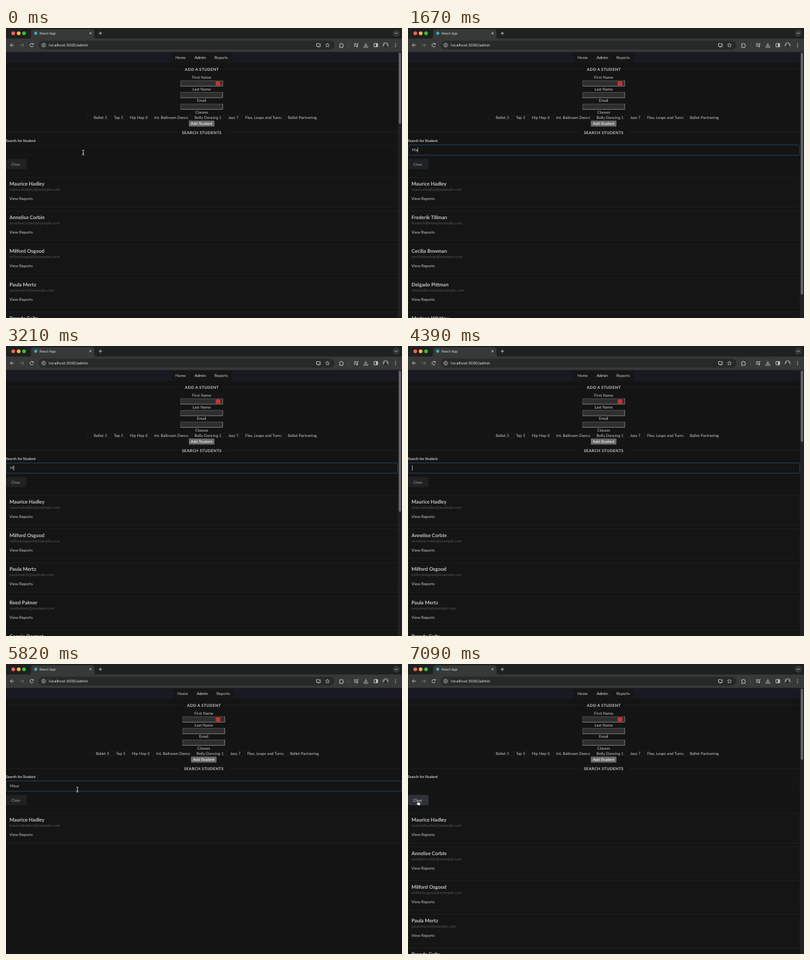
These frames come from a looping animation (600 px wide and 440 px high, 7150 ms). An HTML page:

```html
<!DOCTYPE html>
<html lang="en">
<head>
<meta charset="utf-8">
<title>React App</title>
<style>
  html, body { margin: 0; width: 100%; height: 100%; overflow: hidden; background: #141414; }
  svg { display: block; width: 600px; height: 440px; }
  text { font: 6px Lato, sans-serif; fill: #c8c8c8; text-rendering: geometricPrecision; white-space: pre; }
  .ui { font-family: Inter, sans-serif; fill: #e3e3e3; }
  .mid { text-anchor: middle; }
  .bold { font-weight: 700; }
  .title { font-weight: 700; letter-spacing: .3px; }
  .name { font-weight: 700; font-size: 7.55px; }
  .mail { fill: #555; font-size: 5.9px; }
  .icon { fill: none; stroke: #c7c7c7; stroke-width: .9; }
  .line { fill: none; stroke: #252525; stroke-width: .6; }
</style>
</head>
<body>
<svg viewBox="0 0 600 440" xmlns="http://www.w3.org/2000/svg">
  <rect width="600" height="440" fill="#141414"/>

  <!-- page -->
  <rect y="36" width="600" height="17" fill="#191a21"/>
  <g id="form">
    <rect x="250" y="37" width="92.5" height="15.5" rx="1.5" fill="#161617"/>
    <text x="256.5" y="47">Home</text>
    <text x="285.7" y="47" style="fill:#e4e4e4">Admin</text>
    <text x="315.7" y="47">Reports</text>
    <path class="line" d="M-4 62.3H265M328 62.3H600M-4 158.3H261M332 158.3H600"/>
    <text class="title mid" x="296.8" y="64.5">ADD A STUDENT</text>
    <text class="title mid" x="296.6" y="160.5">SEARCH STUDENTS</text>
    <g id="fields"></g>
    <text class="mid" x="296.5" y="130.2">Classes</text>
    <g id="classes"></g>
    <rect x="277" y="140.4" width="38.8" height="9.2" rx="1" fill="#6b6b6b"/>
    <text class="mid" x="296.4" y="147" style="fill:#fff">Add Student</text>
  </g>
  <rect x="317.7" y="81" width="7" height="6.4" rx="1" fill="#d1302b"/>

  <text class="bold" x="-.3" y="173.2" style="font-size:5.5px">Search for Student</text>
  <rect class="line wide" x=".3" y="177.4" height="15.6" rx="1.7" style="stroke:#1d1d1d"/>
  <rect class="line wide" id="focus" x=".3" y="177.4" height="15.6" rx="1.7" style="stroke:#2b455c;stroke-width:.9"/>
  <text id="query" x="6" y="187.4"></text>
  <rect id="caret" y="181.2" width=".7" height="7.6" fill="#ddd"/>
  <rect y="198.7" width="31" height="15.5" rx="1.7" fill="#202123"/>
  <rect id="hover" y="198.7" width="31" height="15.5" rx="1.7" fill="#2e3236"/>
  <text id="clear" x="8" y="208.6">Clear</text>
  <path d="M0 220H600" class="line" style="stroke:#1b1b1b"/>
  <g id="rows"></g>
  <g id="scroll">
    <rect x="593.8" y="36" width="6.2" height="404" fill="#212121"/>
    <rect id="thumb" x="595.2" y="37.5" width="3.4" rx="1.7" fill="#6a6a6a"/>
  </g>

  <!-- browser -->
  <rect width="600" height="17" fill="#1f2020"/>
  <rect y="16" width="600" height="20.4" fill="#373838"/>
  <path d="M34 16.5Q38 16.5 38 12.5V6Q38 2 42 2H130Q134 2 134 6V12.5Q134 16.5 138 16.5Z" fill="#373838"/>
  <circle cx="11" cy="8" r="2.8" fill="#ff5f57"/>
  <circle cx="19.2" cy="8" r="2.8" fill="#febc2e"/>
  <circle cx="27.3" cy="8" r="2.8" fill="#28c840"/>
  <circle cx="45" cy="8" r="2.4" fill="#3fa9c4"/>
  <text class="ui" x="51" y="9.9" style="font-size:5px">React App</text>
  <path class="icon" d="M126.5 6.3l3.2 3.2m0-3.2l-3.2 3.2M140.5 8h5m-2.5-2.5v5"/>
  <circle cx="591.3" cy="7.8" r="5.4" fill="#343535"/>
  <path class="icon" d="M589.3 7l2 2l2-2"/>
  <path class="icon" d="M12 26H6.6m2.6-2.7L6.5 26l2.7 2.7"/>
  <path class="icon" d="M21.4 26h5.4m-2.6-2.7l2.7 2.7l-2.7 2.7" style="stroke:#777"/>
  <path class="icon" d="M40.9 24.3A2.6 2.6 0 1 0 41.4 27M41.4 23v1.9h-1.9"/>
  <rect x="49.5" y="19.3" width="448" height="13.4" rx="6.7" fill="#272828"/>
  <circle cx="57" cy="26" r="5" fill="#373838"/>
  <circle class="icon" cx="57" cy="26" r="2.5" style="stroke-width:.7"/>
  <path class="icon" d="M57 25.6v1.8m0-3.2v.7" style="stroke-width:.7"/>
  <text class="ui" x="65" y="28.1" style="font-size:5.75px">localhost:3000/admin</text>
  <path class="icon" d="M474 23.6h-3.4v4.4h6v-1.5m-4.4 2.2h2.8M475.6 22.8v3m-1.3-1.2l1.3 1.3l1.3-1.3"/>
  <path class="icon" d="M487 23l.9 2l2.2.2l-1.7 1.5l.5 2.1l-1.9-1.1l-1.9 1.1l.5-2.1l-1.7-1.5l2.2-.2z" style="stroke-width:.7"/>
  <path class="icon" d="M505.4 24.2h1.6a1 1 0 0 1 2 0h1.5v1.6a1 1 0 0 1 0 2v1.5h-5.1v-1.5a1 1 0 0 0 0-2z"/>
  <path d="M519 22.5v7" stroke="#555" stroke-width=".7"/>
  <path class="icon" d="M527.3 23.8h4m-4 2h4m-4 2h2.4M532.6 28.2v-4.7h1.4"/>
  <circle cx="531.8" cy="28.2" r="1.1" fill="#c7c7c7"/>
  <path class="icon" d="M545.2 22.8v4.4m-2-1.9l2 2l2-2M542.3 27.3v1.8h5.8v-1.8"/>
  <rect class="icon" x="557.5" y="23.4" width="5.6" height="5.2" rx=".6"/>
  <rect x="560.5" y="23.4" width="2.6" height="5.2" fill="#c7c7c7"/>
  <circle cx="575.2" cy="26" r="4.3" fill="#8b8d90"/>
  <path d="M571.7 28.5q.3-2.2 2.3-2.4a1.7 1.7 0 1 1 2.4 0q2 .2 2.3 2.4a4.3 4.3 0 0 1-7 0z" fill="#2b2c30"/>
  <g fill="#c7c7c7"><circle cx="590.3" cy="23.6" r=".7"/><circle cx="590.3" cy="26" r=".7"/><circle cx="590.3" cy="28.4" r=".7"/></g>

  <!-- pointers, each around its own origin -->
  <g class="ptr" id="beam">
    <path d="M-1.7-3.7Q0-3.7 0-2.7Q0-3.7 1.7-3.7M0-2.9V2.9M-1.7 3.7Q0 3.7 0 2.7Q0 3.7 1.7 3.7M-.9 1.1H.9" fill="none" stroke="#ddd" stroke-width=".8"/>
  </g>
  <path class="ptr" id="arrow" d="M0 0V6.7L1.6 5.2L2.6 7.6L3.7 7.1L2.7 4.8H4.8Z" fill="#000" stroke="#fff" stroke-width=".6"/>
  <path class="ptr" id="hand" d="M-1.4-3.2q.7-.9 1.2.1l.3 2l2.6.5q.8.3.6 1.4l-.6 2.7h-3.3l-2-2.6q-.5-1 .5-.9l.9.6z" fill="#fff" stroke="#111" stroke-width=".5"/>
</svg>
<script>
const LOOP = 7150;
const $ = id => document.getElementById(id);
const show = (el, on) => el.setAttribute('display', on ? 'inline' : 'none');
const clamp = v => Math.max(0, Math.min(1, v));
const ramp = (t, start, length) => clamp((t - start) / length);

const students = [
  'Maurice Hadley', 'Annelise Corbin', 'Milford Osgood', 'Paula Mertz', 'Brenda Colts',
  'Reed Palmer', 'Connie Dermot', 'Frederik Tillman', 'Cecilia Bowman',
  'Delgado Pittman', 'Marlena Whitley'
];
const aliases = { 'Delgado Pittman': 'rosalindkearney' };
const mail = name => (aliases[name] || name.toLowerCase().replace(' ', '')) + '@example.com';

const typing = [
  [0, ''], [1250, 'M'], [1500, 'Ma'], [1760, 'Mau'], [1940, 'Maur'],
  [2900, 'Mau'], [3030, 'Ma'], [3180, 'M'], [3580, ''],
  [4450, 'M'], [4620, 'Ma'], [4820, 'Mau'], [4960, 'Maur'], [6780, '']
];
const caretOff = [[0, 330], [830, 1180], [2460, 2830], [3940, 4340], [5450, 5900], [6480, LOOP]];
const thumbs = [108, 214, 367];
const moves = [
  [0, 117, 189], [150, 117, 189], [300, 117, 192],
  [5700, 117, 190], [6360, 18, 196], [6450, 15.5, 211], [LOOP, 15.5, 211]
];

$('fields').innerHTML = ['First Name', 'Last Name', 'Email'].map((label, i) => {
  const y = 79.7 + i * 17.6;
  return `<text class="mid" x="296.4" y="${y - 2.5}">${label}</text>
    <rect x="264.4" y="${y}" width="64.2" height="8.9" fill="#2e2e2e"/>
    <path d="M264.8 ${y + 8.9}V${y + .4}H328.6" fill="none" stroke="#555" stroke-width=".8"/>
    <path d="M264.4 ${y + 8.5}H328.2V${y}" fill="none" stroke="#8c8c8c" stroke-width=".8"/>`;
}).join('');

$('classes').innerHTML = [
  [133, 'Ballet 3'], [163.5, 'Tap 5'], [187.6, 'Hip Hop 8'], [224.5, 'Int. Ballroom Dance'],
  [285.6, 'Belly Dancing 1'], [336.5, 'Jazz 7'], [362.2, 'Flex, Leaps and Turns'], [427, 'Ballet Partnering']
].map(([x, label]) => `<rect class="line" x="${x - 10.4}" y="132.8" width="6.8" height="6.8" rx="1"/>
  <text x="${x}" y="138.3">${label}</text>`).join('');

$('rows').innerHTML = Array.from({ length: 5 }, (_, i) => `<g transform="translate(0 ${i * 51})">
  <rect class="line wide" x=".2" y="226.5" height="45.2" rx="1.7" style="fill:#151515"/>
  <text class="name" x="5.3" y="238.6"></text>
  <text class="mail" x="5.3" y="246.5"></text>
  <text x="5.3" y="260.7">View Reports</text></g>`).join('');
const rows = [...$('rows').children];

let shown = null;
function search(query) {
  if (query === shown) return;
  shown = query;
  const hits = students.filter(s => s.toLowerCase().includes(query.toLowerCase()));
  const long = query.length < 3;
  rows.forEach((row, i) => {
    show(row, i < hits.length);
    if (!hits[i]) return;
    row.children[1].textContent = hits[i];
    row.children[2].textContent = mail(hits[i]);
  });
  document.querySelectorAll('.wide').forEach(el => el.setAttribute('width', long ? 593.2 : 599.5));
  $('form').setAttribute('transform', `translate(${long ? 0 : 3.2} 0)`);
  show($('scroll'), long);
  if (long) $('thumb').setAttribute('height', thumbs[query.length]);
  $('query').textContent = query;
  $('caret').setAttribute('x', 6 + (query ? $('query').getComputedTextLength() : 0));
}

function pointerAt(t) {
  const i = moves.findIndex(m => m[0] > t);
  const [t0, x0, y0] = moves[i - 1], [t1, x1, y1] = moves[i];
  const u = (t - t0) / (t1 - t0), e = u * u * (3 - 2 * u);
  return [x0 + (x1 - x0) * e, y0 + (y1 - y0) * e];
}

function draw(t) {
  search(typing.filter(k => k[0] <= t).pop()[1]);
  show($('caret'), !caretOff.some(([a, b]) => t >= a && t < b));
  $('focus').setAttribute('opacity', ramp(t, 290, 80) - ramp(t, 6680, 100));
  const hover = ramp(t, 6390, 60);
  $('hover').setAttribute('opacity', hover);
  const grey = 155 + 55 * hover;
  $('clear').style.fill = `rgb(${grey},${grey},${grey})`;

  const [x, y] = pointerAt(t);
  const kind = y < 193 ? 'beam' : y < 199 ? 'arrow' : 'hand';
  document.querySelectorAll('.ptr').forEach(p => {
    show(p, p.id === kind && (t < 1150 || t >= 5700));
    p.setAttribute('transform', `translate(${x} ${y})`);
  });
}

const start = performance.now();
function tick(now) {
  draw(Math.max(0, now - start) % LOOP);
  requestAnimationFrame(tick);
}
draw(0);
requestAnimationFrame(tick);
</script>
</body>
</html>
```
